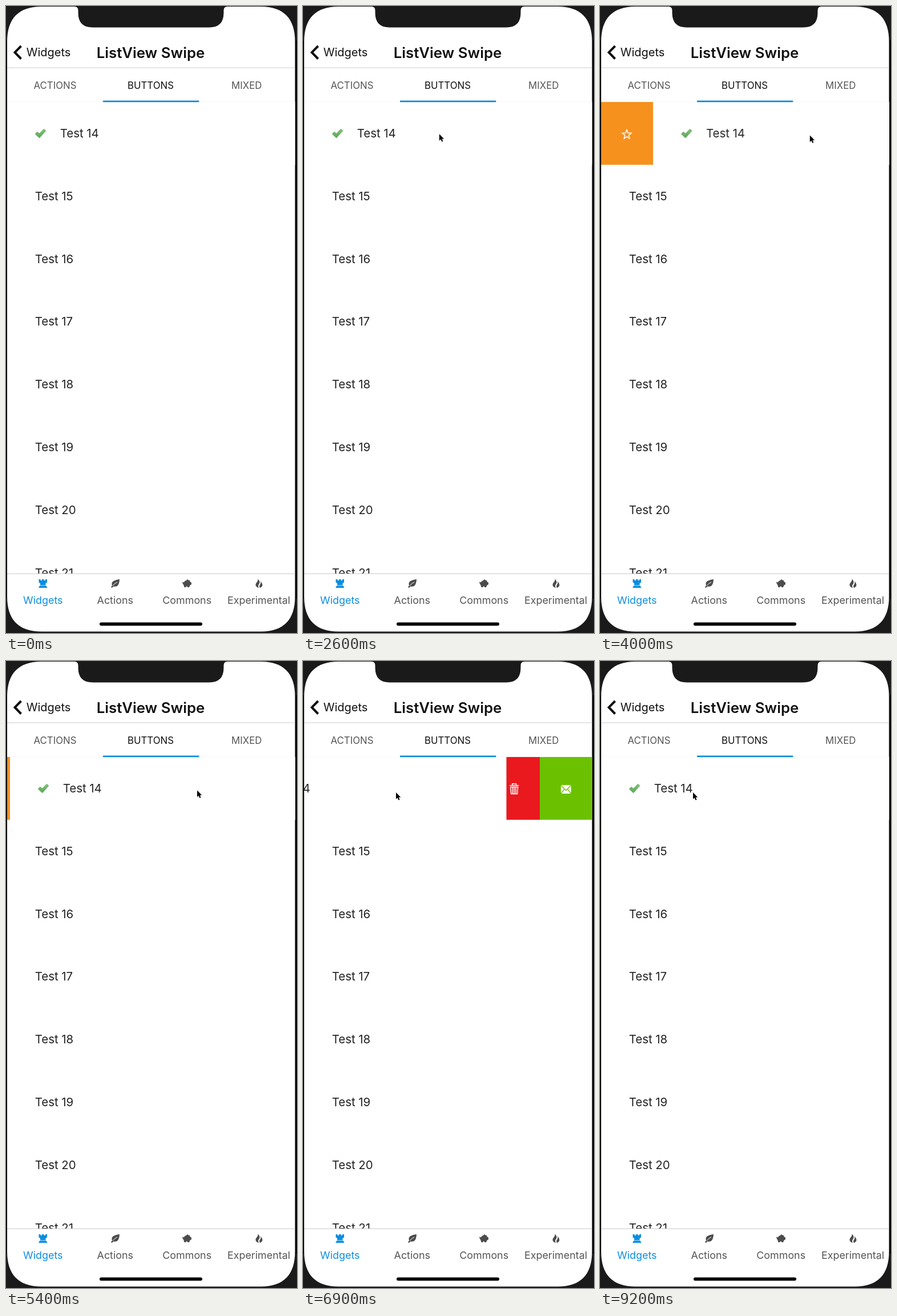
An HTML page for the animation above (9.8 s loop, 510 px wide and 1097 px high).

```html
<!DOCTYPE html>
<html lang="en">
<head>
<meta charset="utf-8">
<title>ListView Swipe</title>
<style>
  html, body { margin: 0; width: 100%; height: 100%; overflow: hidden; background: #1a1a1a; }
  svg { display: block; width: 100%; height: 100%; font-family: Inter, "Open Sans", sans-serif; }
  .item { font-size: 20.4px; fill: #222; }
  .top { font-size: 16.8px; fill: #555; text-anchor: middle; }
  .nav { font-size: 17.9px; fill: #555; text-anchor: middle; }
  .top.on { fill: #111; }
  .nav.on { fill: #0c8ee0; }
  .icon { fill: #4c4c4c; }
</style>
</head>
<body>
<svg viewBox="0 0 510 1097">
  <defs>
    <clipPath id="list"><rect x="2" y="168" width="504.5" height="825"/></clipPath>
    <linearGradient id="leafGreen" x1="0" y1="0" x2="0" y2="1">
      <stop offset="0" stop-color="#86c878"/><stop offset="1" stop-color="#57a558"/>
    </linearGradient>
  </defs>

  <rect width="510" height="1097" fill="#1a1a1a"/>
  <path d="M0 60V1037M508.5 60V1037" stroke="#050505" stroke-width="3"/>
  <path fill="#fff" d="M2 62C2 22 22 1 62 1H120Q126.500 1 126.500 8V12Q126.500 37.500 152 37.500H356Q381.500 37.500 381.500 12V8Q381.500 1 388 1H446.500C486.500 1 506.500 22 506.500 62V1033.500C506.500 1073.500 486.500 1094.500 446.500 1094.500H62C22 1094.500 2 1073.500 2 1033.500Z"/>

  <path d="M26.500 70L15.500 81.200L26.500 92.500" fill="none" stroke="#111" stroke-width="4"/>
  <text x="35.700" y="88.200" font-size="20" fill="#111">Widgets</text>
  <text x="253.500" y="91" font-size="25.800" font-weight="600" fill="#111" text-anchor="middle">ListView Swipe</text>
  <path d="M2 108H506.500" stroke="#ccc"/>
  <text class="top" x="86" y="144.500">ACTIONS</text>
  <text class="top on" x="253.500" y="144.500">BUTTONS</text>
  <text class="top" x="421.700" y="144.500">MIXED</text>
  <path d="M2 168H506.500" stroke="#f0f0f0"/>

  <g clip-path="url(#list)">
    <g id="items"></g>
    <g id="leftPanel">
      <rect x="2" y="168" width="91.300" height="109.800" fill="#f6911e"/>
      <path id="star" fill="none" stroke="#fff" stroke-width="1.600"/>
    </g>
    <g id="rightPanel">
      <rect x="323.500" y="168" width="92" height="109.800" fill="#e9191e"/>
      <rect x="415" y="168" width="91.500" height="109.800" fill="#6bc100"/>
      <path d="M362 217.700H378.300M366.800 217V214.700H373.500V217M363.700 220.500L364.700 232.500H375.600L376.600 220.500ZM367.300 221V232M370.150 221V232M373 221V232" fill="none" stroke="#fff" stroke-width="1.500"/>
      <rect x="452" y="217" width="17.800" height="15" fill="#fff"/>
      <path d="M452 217.500L460.900 226.500L469.800 217.500M452 232L458.300 224M469.800 232L463.500 224" fill="none" stroke="#6bc100" stroke-width="1.300"/>
    </g>
    <g id="row">
      <rect x="2" y="168" width="504.500" height="110" fill="#fff"/>
      <path d="M51.300 224L54.600 220.300L58.600 223.300L66.300 215.300L69.800 218.300L58.500 230.800Z" fill="url(#leafGreen)" stroke="#4f9c50" stroke-width=".8" stroke-linejoin="round"/>
      <text class="item" x="94.700" y="230">Test 14</text>
    </g>
  </g>
  <rect x="170" y="165.500" width="168.300" height="2.700" fill="#0c8ad8"/>

  <path d="M2 993.300H506.500" stroke="#c8c8c8"/>
  <path fill="#0c8ee0" d="M57.500 1003H60.500V1005H63V1003H66.500V1005H69V1003H72V1008.500L69.500 1010V1013.500H60V1010L57.500 1008.500ZM59 1014.300H70.500L72.500 1018H57Z"/>
  <g class="icon">
    <path d="M199 1003C198.500 1012 196 1017 188.500 1015.500L185.500 1018L184 1016.800L186 1014C183.500 1006.500 190 1004.500 199 1003Z"/>
    <path d="M187 1014.500Q190 1010 195 1008" fill="none" stroke="#fff"/>
    <path d="M309 1007.500L311.500 1008.500Q313 1005.500 316 1005L317 1003.500H319L320 1005L322 1004.500V1006.500L325 1009V1012L322.500 1013.500L321 1017H318V1015.500H315.500V1017H312.500L311.500 1013.500L309.500 1010Z"/>
    <path d="M441.500 1002.500C445 1006 445.500 1009 443 1012C441.500 1014 442 1016 443 1018C438.500 1017 436.500 1013.500 438 1010.500C439.500 1008 442 1006 441.500 1002.500Z"/>
    <path d="M446 1006.500C450 1010 451.500 1016 445 1018C443.500 1015.500 444 1014 445.500 1012C447 1010 446.500 1008 446 1006.500Z"/>
  </g>
  <text class="nav on" x="64.800" y="1046.300">Widgets</text>
  <text class="nav" x="191.300" y="1046.300">Actions</text>
  <text class="nav" x="317.200" y="1046.300">Commons</text>
  <text class="nav" x="443" y="1046.300">Experimental</text>
  <rect x="164" y="1078.500" width="180" height="5.700" rx="2.850" fill="#000"/>

  <path id="cursor" d="M0 0V11.700L2.600 9.300L4.500 13.600L6.500 12.700L4.700 8.600H8.300Z" fill="#000" stroke="#fff" stroke-width="1.800" stroke-linejoin="round" paint-order="stroke"/>
</svg>
<script>
const LOOP = 9800, STEP = 100, OPEN_LEFT = 91.3, OPEN_RIGHT = -183, SLOP = 22;
const $ = id => document.getElementById(id);

for (let i = 1; i < 8; i++) {
  const label = document.createElementNS('http://www.w3.org/2000/svg', 'text');
  label.setAttribute('class', 'item');
  label.setAttribute('x', 50.7);
  label.setAttribute('y', 230 + i * 109.8);
  label.textContent = `Test ${14 + i}`;
  $('items').append(label);
}

const starPoint = (_, i) => {
  const angle = i * Math.PI / 5, r = i % 2 ? 3.6 : 8.2;
  return `${47 + r * Math.sin(angle)} ${225 - r * Math.cos(angle)}`;
};
$('star').setAttribute('d', `M${Array.from({ length: 10 }, starPoint).join('L')}Z`);

// A run of values, one per step, starting at a given time
const run = (start, values) => values.map((v, i) => [start + i * STEP, v]);

const enter = run(2000, [333, 318, 291, 262, 246, 240, 238.8]);
const dragRight = run(2900, [252, 285, 325, 358, 375, 380, 381]);
const moveBack = run(4000, [367.8, 350, 339, 335]);
const dragLeft = run(6400, [322, 285, 240, 198, 172, 163]);
const cursorX = [...enter, ...dragRight, ...moveBack, ...dragLeft];
const cursorY = t => t < 2900 ? 224 : t < 6400 ? 226.3 : 230;

const close = (start, from) =>
  run(start, [.9, .45, .2, .1, .055, .022, 0].map(k => k * from));

const offsets = [
  [0, 0],
  ...dragRight.map(([t, x]) => [t, Math.min(OPEN_LEFT, Math.max(0, x - 239 - SLOP))]),
  ...close(5000, OPEN_LEFT),
  ...dragLeft.map(([t, x]) => [t, Math.min(0, x - 335 + SLOP)]),
  ...run(7000, [-157, -164, -171, -176.5, OPEN_RIGHT]),
  ...close(8600, OPEN_RIGHT)
];

// Plays a [time, value] table with held steps
function play(el, table, style) {
  const frames = table.map(([t, v]) => ({ offset: t / LOOP, easing: 'step-end', ...style(v, t) }));
  frames.push({ ...frames[frames.length - 1], offset: 1 });
  el.animate(frames, { duration: LOOP, iterations: Infinity });
}

play($('row'), offsets, x => ({ transform: `translate(${x}px, 0px)` }));
play($('leftPanel'), offsets, x => ({ opacity: x > 0 ? 1 : 0 }));
play($('rightPanel'), offsets, x => ({ opacity: x < 0 ? 1 : 0 }));
play($('cursor'), [[0, 333], ...cursorX], (x, t) => ({
  transform: `translate(${x}px, ${cursorY(t)}px)`,
  opacity: t < 2000 ? 0 : 1
}));
</script>
</body>
</html>
```
